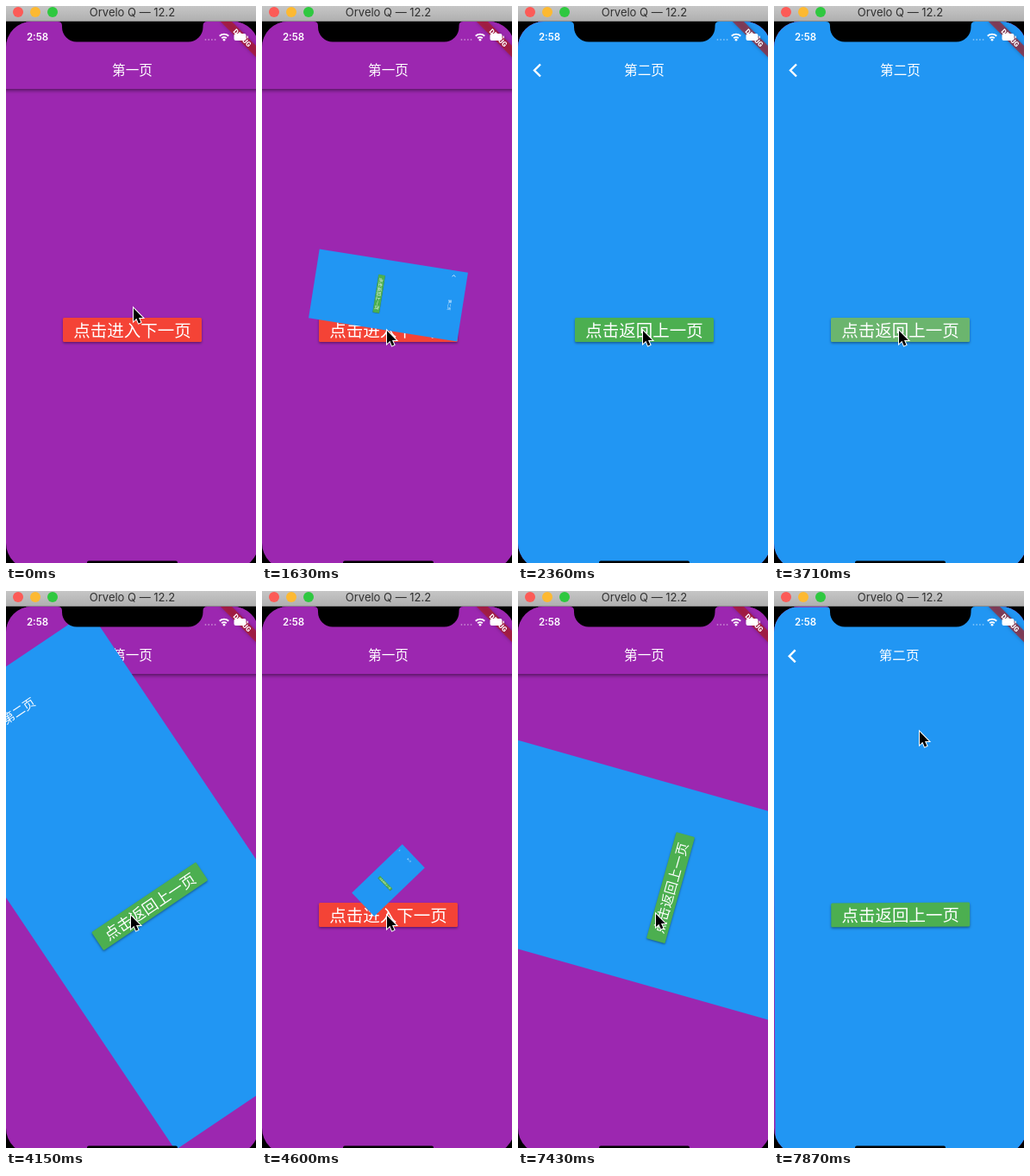
Recreate the animation shown at these times as an HTML page with a canvas. Size 290 by 645 pixels, loop 8000 ms.

```html
<!DOCTYPE html>
<html lang="zh">
<head>
<meta charset="utf-8">
<title>Page transition</title>
<style>
  html, body { margin: 0; width: 100%; height: 100%; overflow: hidden; background: #000; }
  canvas { display: block; }
</style>
</head>
<body>
<canvas id="stage" width="290" height="645"></canvas>
<script>
const ctx = document.getElementById('stage').getContext('2d');
const LOOP = 8000, STEP = 148.5, ROUTE = 1000;
const SCREEN = { x: 0, y: 18, w: 293, h: 634, cx: 146.5, cy: 335 };
const CJK = '"Noto Sans CJK SC", "Noto Sans CJK", sans-serif';
const LATIN = 'Inter, Roboto, sans-serif';
const PUSH_1 = 1368, POP = 3800, PUSH_2 = 6910;
const PRESSED_STEPS = [9, 25];

// Pointer tip by step: [step, x, y]
const POINTER = [
  [0, 148, 350], [1, 147, 362], [2, 144, 375], [3, 144, 382], [5, 144, 382],
  [6, 144, 379], [7, 145, 376], [38, 145, 376], [39, 188, 240], [40, 228, 115],
  [41, 205, 210], [42, 150, 325], [43, 112, 388], [44, 140, 381], [45, 160, 374],
  [51, 160, 374], [53, 169, 163]
];

const clamp = x => Math.min(1, Math.max(0, x));

// cubic-bezier(.4, 0, .2, 1)
function fastOutSlowIn(x) {
  let lo = 0, hi = 1;
  for (let i = 0; i < 30; i++) {
    const s = (lo + hi) / 2, r = 1 - s;
    if (1.2 * s * r * r + 0.6 * s * s * r + s ** 3 < x) lo = s; else hi = s;
  }
  return lo * lo * (3 - 2 * lo);
}

function routeProgress(time) {
  if (time >= PUSH_2) return fastOutSlowIn(clamp((time - PUSH_2) / ROUTE));
  if (time >= POP) return fastOutSlowIn(clamp(1 - (time - POP) / ROUTE));
  return fastOutSlowIn(clamp((time - PUSH_1) / ROUTE));
}

function pointerAt(step) {
  const i = Math.max(1, POINTER.findIndex(p => p[0] >= step));
  const [s0, x0, y0] = POINTER[i - 1], [s1, x1, y1] = POINTER[i];
  const k = (step - s0) / (s1 - s0);
  return [x0 + (x1 - x0) * k, y0 + (y1 - y0) * k];
}

function roundRect(x, y, w, h, r, color) {
  ctx.beginPath();
  ctx.roundRect(x, y, w, h, r);
  if (color) { ctx.fillStyle = color; ctx.fill(); }
}

function circle(x, y, r, color) {
  ctx.beginPath();
  ctx.arc(x, y, r, 0, Math.PI * 2);
  ctx.fillStyle = color;
  ctx.fill();
}

function polyline(points, width, color) {
  ctx.beginPath();
  points.forEach(([x, y]) => ctx.lineTo(x, y));
  ctx.lineWidth = width;
  ctx.strokeStyle = color;
  ctx.stroke();
}

function text(str, x, y, font, color = '#fff', align = 'center') {
  ctx.font = font;
  ctx.textAlign = align;
  ctx.fillStyle = color;
  ctx.fillText(str, x, y);
}

function withShadow(blur, dy, alpha, draw) {
  ctx.save();
  ctx.shadowColor = `rgba(0,0,0,${alpha})`;
  ctx.shadowBlur = blur;
  ctx.shadowOffsetY = dy;
  draw();
  ctx.restore();
}

function button(label, color, scale, pressed) {
  withShadow(3 * scale, 1.5 * scale, 0.4, () => roundRect(66, 361, 161, 28, 1.5, color));
  if (pressed) roundRect(66, 361, 161, 28, 1.5, 'rgba(200,200,200,.25)');
  text(label, SCREEN.cx, 382.6, '500 19.5px ' + CJK);
}

function pageTitle(label) {
  text(label, SCREEN.cx, 80, '500 15.6px ' + CJK);
}

function firstPage(pressed) {
  ctx.fillStyle = '#9c27b0';
  ctx.fillRect(SCREEN.x, SCREEN.y, SCREEN.w, SCREEN.h);
  withShadow(4, 1.5, 0.45, () => ctx.fillRect(-10, 18, 313, 78));
  pageTitle('第一页');
  button('点击进入下一页', '#f44336', 1, pressed);
}

function secondPage(v, pressed) {
  if (v <= 0) return;
  ctx.save();
  ctx.translate(SCREEN.cx, SCREEN.cy);
  ctx.rotate(v * Math.PI * 2);
  ctx.scale(v, v);
  ctx.translate(-SCREEN.cx, -SCREEN.cy);
  ctx.fillStyle = '#2196f3';
  ctx.fillRect(SCREEN.x, SCREEN.y, SCREEN.w, SCREEN.h);
  pageTitle('第二页');
  polyline([[26, 67.5], [19, 74.5], [26, 81.5]], 2.4, '#fff');
  button('点击返回上一页', '#4caf50', v, pressed);
  ctx.restore();
}

function debugBanner() {
  ctx.save();
  ctx.translate(SCREEN.w, SCREEN.y);
  ctx.rotate(Math.PI / 4);
  withShadow(4, 0, 0.4, () => {
    ctx.fillStyle = 'rgba(183,28,28,.63)';
    ctx.fillRect(-31.2, 21.9, 62.4, 9.4);
  });
  text('DEBUG', 0, 29.5, '900 8px Roboto, sans-serif');
  ctx.restore();
}

function statusBar() {
  text('2:58', 36.5, 40.2, '600 11.5px ' + LATIN);
  for (let i = 0; i < 4; i++) circle(231.5 + i * 3.7, 39, 0.9, 'rgba(255,255,255,.4)');
  for (const r of [3.9, 7.4]) {
    ctx.beginPath();
    ctx.arc(253, 40, r, -Math.PI * 0.75, -Math.PI * 0.25);
    ctx.lineWidth = 1.9;
    ctx.strokeStyle = '#fff';
    ctx.stroke();
  }
  circle(253, 39.2, 1.4, '#fff');
  roundRect(264.5, 32, 14, 8, 2, '#fff');
  roundRect(279.5, 34.5, 1.3, 3, 0.6, '#fff');
}

function notch() {
  ctx.beginPath();
  ctx.moveTo(60, 18);
  ctx.quadraticCurveTo(65, 18, 65, 23);
  ctx.arcTo(65, 41.5, 84, 41.5, 17);
  ctx.arcTo(228.5, 41.5, 228.5, 23, 17);
  ctx.lineTo(228.5, 23);
  ctx.quadraticCurveTo(228.5, 18, 233.5, 18);
  ctx.fillStyle = '#000';
  ctx.fill();
}

function windowBar() {
  const grey = ctx.createLinearGradient(0, 0, 0, 18);
  grey.addColorStop(0, '#c6c6c6');
  grey.addColorStop(1, '#afafaf');
  ctx.fillStyle = grey;
  ctx.fillRect(0, 0, 290, 18);
  ctx.fillStyle = '#8a8a8a';
  ctx.fillRect(0, 17, 290, 1);
  ['#fc5b57', '#fdb932', '#2fc840'].forEach((color, i) => circle(14 + i * 20, 7, 6, color));
  text('Orvelo Q — 12.2', SCREEN.cx, 11.8, '13px ' + LATIN, '#303030');
}

function pointer(x, y) {
  ctx.save();
  ctx.translate(x, y);
  ctx.beginPath();
  [[0, 0], [0, 15], [3.4, 11.8], [5.8, 17.4], [8.4, 16.3], [6, 10.9], [10.8, 10.9]]
    .forEach(([px, py]) => ctx.lineTo(px, py));
  ctx.closePath();
  ctx.lineWidth = 2;
  ctx.strokeStyle = '#fff';
  ctx.stroke();
  ctx.fillStyle = '#000';
  ctx.fill();
  ctx.restore();
}

// The picture holds between steps, like a low-rate screen recording.
function draw(ms) {
  const step = Math.floor((ms % LOOP + 18) / STEP);
  const v = routeProgress(step * STEP);
  const pressed = PRESSED_STEPS.includes(step);

  ctx.fillStyle = '#000';
  ctx.fillRect(0, 0, 290, 645);
  ctx.save();
  roundRect(SCREEN.x, SCREEN.y, SCREEN.w, SCREEN.h, 30);
  ctx.clip();
  firstPage(pressed && v < 0.5);
  secondPage(v, pressed && v > 0.5);
  debugBanner();
  statusBar();
  roundRect(94, 642.5, 105, 4, 2, '#000');
  ctx.restore();
  notch();
  windowBar();
  pointer(...pointerAt(step));
}

const start = performance.now();
function tick() {
  draw(performance.now() - start);
  requestAnimationFrame(tick);
}
tick();
</script>
</body>
</html>
```
